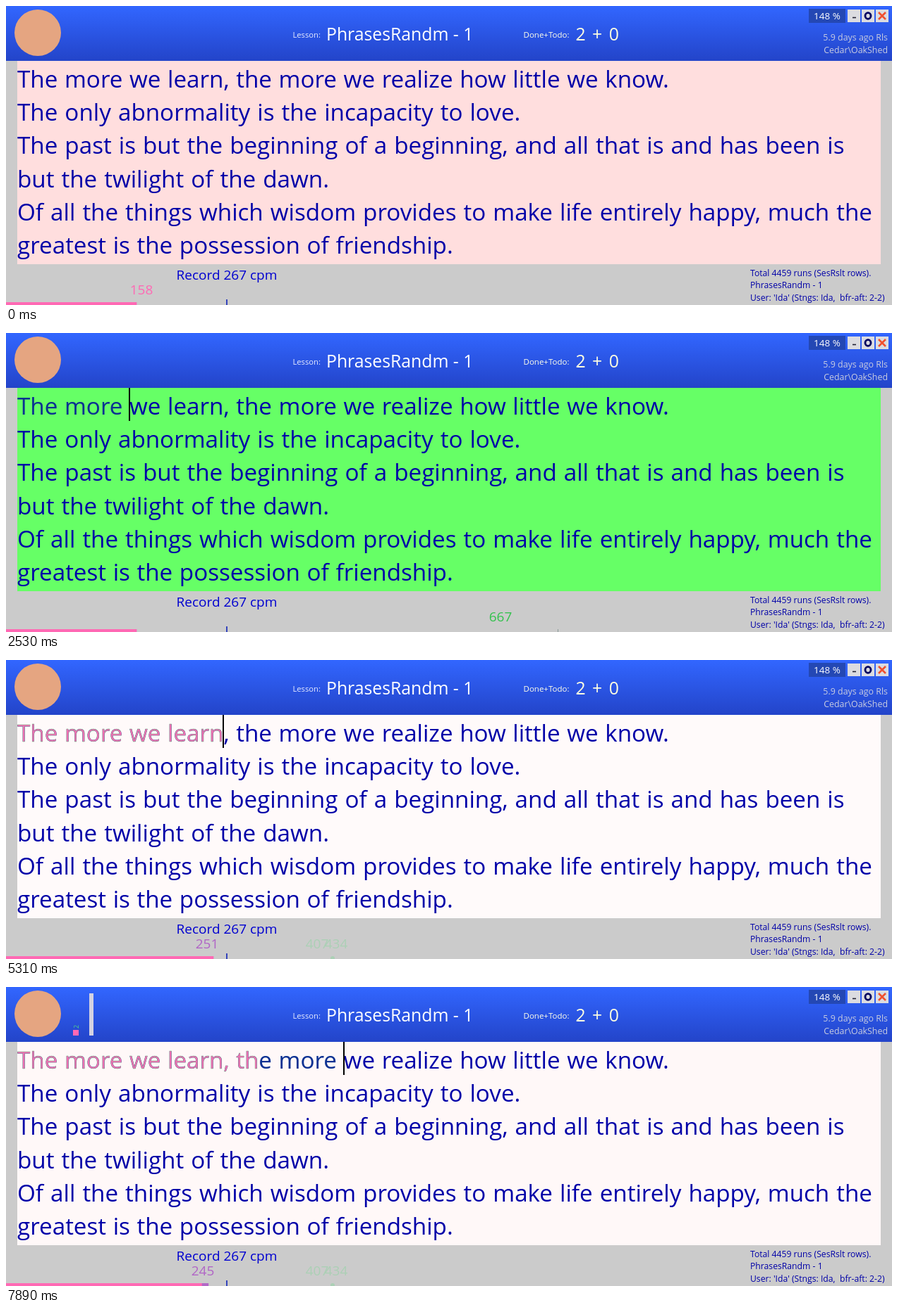
Animation, 1256 px wide and 425 px high, one loop 8 s. Source, as an HTML page:

```html
<!DOCTYPE html>
<html lang="en">
<head>
<meta charset="utf-8">
<title>Typing trainer</title>
<style>
  html, body { margin: 0; width: 100%; height: 100%; overflow: hidden; background: #cbcbcb; }
  svg { display: block; width: 1256px; height: 425px; }
  text { font-family: "Open Sans", "Noto Sans", sans-serif; white-space: pre; }
  .lines { font-size: 33.2px; fill: #0000a8; word-spacing: 1.4px; }
  .lines .tight { word-spacing: 1px; }
  .caption { font-size: 11.2px; fill: #e8ecff; }
  .title { font-size: 24.75px; fill: #fff; }
  .count { font-size: 24.8px; fill: #ffffe0; word-spacing: 3px; }
  .meta { font-size: 12.4px; fill: #c8cce0; text-anchor: end; }
  .info { font-size: 12.2px; fill: #0000a8; }
  .speed { font-size: 19px; text-anchor: middle; }
  .err { fill: #ff69b4; }
  .fixed { fill: #ee70b2; stroke: #5fb878; stroke-width: .3px; }
  .ok { fill: #30c850; fill-opacity: .25; }
</style>
</head>
<body>
<svg viewBox="0 0 1256 425">
  <defs>
    <linearGradient id="sky" x2="0" y2="1">
      <stop stop-color="#3266ff"/><stop offset="1" stop-color="#2344c9"/>
    </linearGradient>
  </defs>
  <rect width="1256" height="425" fill="#cbcbcb"/>
  <rect width="1256" height="78" fill="url(#sky)"/>
  <circle cx="45" cy="38" r="33" fill="#e5a581"/>

  <g id="meters">
    <rect x="95" y="61" width="8" height="8" fill="#ff69b4"/>
    <text transform="translate(103 59) rotate(-90)" font-size="9" fill="#4ed08a">2</text>
    <rect x="118" y="9" width="6" height="60" fill="#d4d2e2"/>
  </g>

  <text class="caption" x="406.5" y="45">Lesson:</text>
  <text class="title" x="454" y="49">PhrasesRandm - 1</text>
  <text class="caption" x="733.5" y="45" style="font-size:11.5px;fill:#ffffe8">Done+Todo:</text>
  <text class="count" x="807.5" y="49">2 + 0</text>

  <rect x="1138" y="4" width="52" height="20" fill="#2448b4"/>
  <text x="1145" y="19" font-size="13.5" fill="#fff">148 %</text>
  <g fill="#dcdce0">
    <rect x="1193" y="5" width="18" height="18"/>
    <rect x="1213" y="5" width="18" height="18"/>
    <rect x="1233" y="5" width="18" height="18"/>
  </g>
  <path d="M1200 16.5h5" stroke="#223" stroke-width="1.6"/>
  <ellipse cx="1222" cy="14" rx="4" ry="4.3" fill="none" stroke="#000060" stroke-width="2.8"/>
  <path d="M1237 9l10 10m0-10l-10 10" stroke="#f0502f" stroke-width="2.6"/>
  <text class="meta" x="1250" y="49">5.9 days ago Rls</text>
  <text class="meta" x="1250" y="67">Cedar\OakShed</text>

  <rect id="panel" x="16" y="78" width="1224" height="289"/>
  <g class="lines">
    <text class="tight" x="16" y="116" id="first">The more we learn, the more we realize how little we know.</text>
    <text x="16" y="163">The only abnormality is the incapacity to love.</text>
    <text x="16" y="210">The past is but the beginning of a beginning, and all that is and has been is</text>
    <text x="16" y="258">but the twilight of the dawn.</text>
    <text x="16" y="305">Of all the things which wisdom provides to make life entirely happy, much the</text>
    <text class="tight" x="16" y="352">greatest is the possession of friendship.</text>
    <text class="tight" x="16" y="116" id="typed"><tspan id="head"></tspan><tspan id="tail" class="ok"></tspan></text>
  </g>
  <rect id="caret" y="78" height="47"/>

  <text class="speed" x="313" y="389" fill="#0000d0">Record 267 cpm</text>
  <g id="trail" fill="#abd0b5">
    <text class="speed" x="441" y="410">407</text>
    <text class="speed" x="468" y="410">434</text>
    <circle cx="463" cy="424" r="3"/>
  </g>
  <text class="speed" id="speed" y="410"></text>
  <rect id="gain" y="421" height="4" fill="#b268c6"/>
  <rect id="bar" y="421" height="4" fill="#ff69b4"/>
  <rect id="tick" y="421" width="1" height="4" fill="#8a9a98"/>
  <rect x="312" y="417" width="2" height="8" fill="#3444bc"/>

  <text class="info" x="1055" y="384">Total 4459 runs (SesRslt rows).</text>
  <text class="info" x="1055" y="401">PhrasesRandm - 1</text>
  <text class="info" x="1055" y="419">User: 'Ida' (Stngs: Ida,  bfr-aft: 2-2)</text>
</svg>
<script>
const LOOP = 8000, GAP = 60, RECORD = 267, LAST_RUN = 158;
const CARET_ON = 580, CLOCK_START = 1480, MAX_CPM = 1000;
const PX_PER_CPM = 1.172;
const $ = id => document.getElementById(id);
const line = $('first').textContent;

// Bursts of keystrokes and when they begin; "<" is backspace.
const bursts = [
  [1430, 'The '], [1880, 'm'], [2110, 'ore '], [2670, 'w'], [2810, 'e'], [3140, ' l'],
  [3530, 'e'], [3760, 'ar'], [3990, 'n '], [5300, '<'], [5530, ', '], [5780, 'thje '],
  [6410, '<<<'], [6870, 'e'], [7190, ' m'], [7560, 'o'], [7740, 're ']
];
const keys = bursts.flatMap(([from, chars]) => [...chars].map((key, i) => ({ t: from + i * GAP, key })));

function pace(count, t) {
  return Math.min(MAX_CPM, Math.round(count * 60000 / Math.max(t - CLOCK_START, GAP)));
}

// Replay the keystrokes into a list of states.
function replay() {
  let s = {
    t: 0, text: '', wrong: false, fixes: 0, marked: 0,
    cpm: LAST_RUN, pink: LAST_RUN, purple: LAST_RUN
  };
  const states = [s];
  const push = change => {
    s = { ...s, ...change };
    const before = s.cpm;
    s.cpm = pace(s.text.length - s.fixes, s.t);
    if (s.cpm < RECORD) {
      s.pink = Math.min(before, s.cpm);
      s.purple = s.cpm;
    }
    states.push(s);
  };
  keys.forEach(({ t, key }, i) => {
    const text = key === '<' ? s.text.slice(0, -1) : s.text + key;
    const wrong = !line.startsWith(text);
    push({
      t, text, wrong,
      fixes: s.fixes + (s.wrong && !wrong),
      marked: wrong && !s.wrong ? s.text.length : s.marked
    });
    // a long pause lets the pace slip once
    if (i + 1 < keys.length && keys[i + 1].t - t > 1000) push({ t: t + 280 });
  });
  return states;
}
const states = replay();

function set(el, attrs) {
  for (const k in attrs) el.setAttribute(k, attrs[k]);
}
const show = (el, on) => el.style.visibility = on ? 'visible' : 'hidden';

// White at the record, green above it, pink below.
function tint(cpm) {
  if (cpm > RECORD) {
    const v = Math.round(255 * RECORD / cpm);
    return `rgb(${v},255,${v})`;
  }
  const v = Math.round(255 - 82 * (1 - cpm / RECORD));
  return `rgb(255,${v},${v})`;
}
const ink = cpm => cpm > RECORD ? '#34c24e' : cpm < 235 ? '#ff69b4' : '#b065c6';

function draw(t) {
  const { text, wrong, fixes, marked, cpm, pink, purple } = states.findLast(s => s.t <= t);
  const split = wrong ? text.length : marked;
  $('head').textContent = text.slice(0, split);
  set($('head'), { class: wrong ? 'err' : 'fixed' });
  $('tail').textContent = text.slice(split);

  const end = text ? $('typed').getComputedTextLength() : 0;
  set($('caret'), { x: Math.round(16 + end) - 1, width: text ? 2 : 1 });
  show($('caret'), t >= CARET_ON);

  set($('panel'), { fill: tint(cpm) });
  $('speed').textContent = cpm;
  set($('speed'), { x: cpm + 34, fill: ink(cpm) });
  set($('tick'), { x: Math.round(cpm * PX_PER_CPM) });
  show($('tick'), cpm > RECORD);
  set($('bar'), { width: pink * PX_PER_CPM });
  set($('gain'), { width: purple * PX_PER_CPM });
  show($('trail'), marked > 0);
  show($('meters'), fixes > 1);
}

const start = performance.now();
function frame() {
  draw((performance.now() - start) % LOOP);
  requestAnimationFrame(frame);
}
frame();
</script>
</body>
</html>
```
